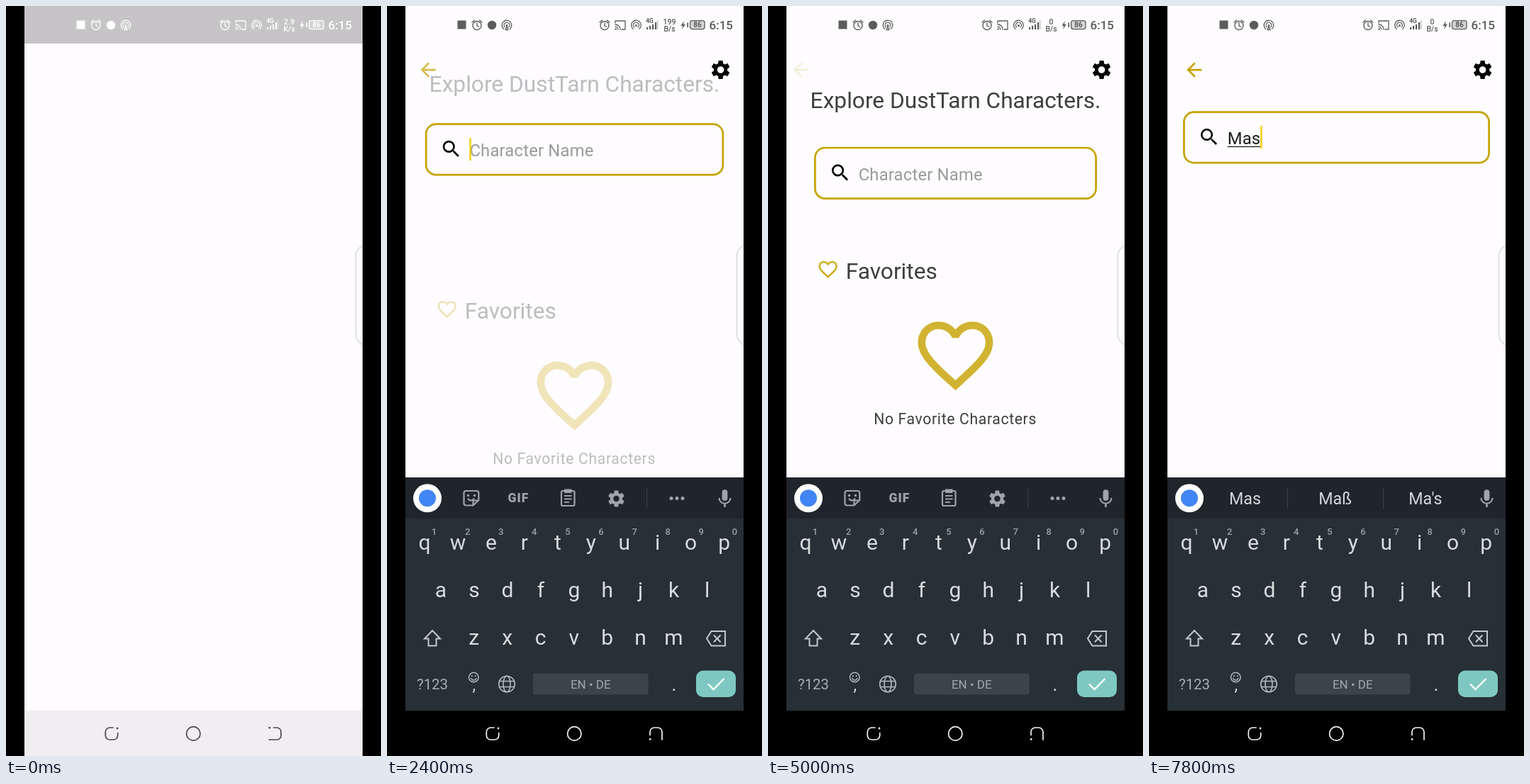
An HTML page with a canvas that plays this animation: 529 by 1058 pixels, repeating every 8 s.

```html
<!DOCTYPE html>
<html lang="en">
<head>
<meta charset="utf-8">
<title>Character search</title>
<style>
html, body { margin: 0; width: 100%; height: 100%; overflow: hidden; background: #000; }
canvas { display: block; width: 529px; height: 1058px; }
</style>
</head>
<body>
<canvas id="stage"></canvas>
<script>
const W = 529, H = 1058, LOOP = 8000, STEP = 200, SLIDE = 900;
const LEFT = 26, WIDE = 477;
const BG = '#fefcff', GOLD = '#c6a302', INK = '#1c1c1c', TOOL = '#a0a4a8', KEY = '#d8dcdf';
const cv = document.getElementById('stage'), c = cv.getContext('2d');
const dpr = window.devicePixelRatio || 1;
cv.width = W * dpr;
cv.height = H * dpr;

const HEART = new Path2D('M16.5 3c-1.74 0-3.41.81-4.5 2.09C10.91 3.81 9.24 3 7.5 3 4.42 3 2 5.42 2 8.5c0 3.78 3.4 6.86 8.55 11.54L12 21.35l1.45-1.32C18.6 15.36 22 12.28 22 8.5 22 5.42 19.58 3 16.5 3zm-4.4 15.55l-.1.1-.1-.1C7.14 14.24 4 11.39 4 8.5 4 6.5 5.5 5 7.5 5c1.54 0 3.04.99 3.57 2.36h1.87C13.46 5.99 14.96 5 16.5 5c2 0 3.5 1.5 3.5 3.5 0 2.89-3.14 5.74-7.9 10.05z');
const ARROW = new Path2D('M20 11H7.83l5.59-5.59L12 4l-8 8 8 8 1.41-1.41L7.83 13H20z');
const LENS = new Path2D('M15.5 14h-.79l-.28-.27A6.47 6.47 0 0 0 16 9.5 6.5 6.5 0 1 0 9.5 16c1.61 0 3.09-.59 4.23-1.57l.27.28v.79l5 4.99L20.49 19zm-6 0a4.5 4.5 0 1 1 0-9 4.5 4.5 0 0 1 0 9z');
const MIC = new Path2D('M12 14a3 3 0 0 0 3-3V5a3 3 0 0 0-6 0v6a3 3 0 0 0 3 3zM17.3 11a5.3 5.3 0 0 1-10.6 0H5a7 7 0 0 0 6 6.7V21h2v-3.3a7 7 0 0 0 6-6.7z');

const clamp = v => Math.min(1, Math.max(0, v));
const mix = (a, b, k) => a + (b - a) * k;

// cubic-bezier(.4, 0, .2, 1)
function ease(x) {
  x = clamp(x);
  let lo = 0, hi = 1, s = x;
  for (let i = 0; i < 24; i++) {
    s = (lo + hi) / 2;
    const bx = 1.2 * s * (1 - s) ** 2 + 0.6 * s * s * (1 - s) + s ** 3;
    if (bx < x) lo = s; else hi = s;
  }
  return 3 * s * s * (1 - s) + s ** 3;
}

function text(str, x, y, size, color, o = {}) {
  c.font = `${o.weight || 400} ${size}px Roboto, Arial, sans-serif`;
  c.textAlign = o.align || 'left';
  c.letterSpacing = (o.gap || 0) + 'px';
  c.fillStyle = color;
  c.fillText(str, x, y);
  return c.measureText(str).width;
}
const mid = (str, x, y, size, color, weight) => text(str, x, y, size, color, { align: 'center', weight });

function rect(x, y, w, h, color) {
  c.fillStyle = color;
  c.fillRect(x, y, w, h);
}
function round(x, y, w, h, r) {
  c.beginPath();
  c.roundRect(x, y, w, h, r);
}
function disc(x, y, r, color) {
  c.fillStyle = color;
  c.beginPath();
  c.arc(x, y, r, 0, 7);
  c.fill();
}
function ring(x, y, r, a = 0, b = Math.PI * 2) {
  c.beginPath();
  c.arc(x, y, r, a, b);
  c.stroke();
}
function pen(color, width) {
  c.strokeStyle = color;
  c.lineWidth = width;
  c.lineCap = c.lineJoin = 'round';
}
function line(...p) {
  c.beginPath();
  for (let i = 0; i < p.length; i += 2) c.lineTo(p[i], p[i + 1]);
  c.stroke();
}
function icon(path, x, y, scale, color) {
  c.save();
  c.translate(x, y);
  c.scale(scale, scale);
  c.fillStyle = color;
  c.fill(path, 'evenodd');
  c.restore();
}
function gear(x, y, scale, color) {
  const pt = (deg, r) => {
    const a = deg * Math.PI / 180;
    c.lineTo(x + Math.cos(a) * r * scale, y + Math.sin(a) * r * scale);
  };
  c.beginPath();
  for (let k = 0; k < 6; k++) {
    const d = 30 + 60 * k;
    pt(d - 21, 7.3); pt(d - 14, 9.7); pt(d - 11, 10);
    pt(d + 11, 10); pt(d + 14, 9.7); pt(d + 21, 7.3);
  }
  c.closePath();
  c.moveTo(x + 3.6 * scale, y);
  c.arc(x, y, 3.6 * scale, 0, 7);
  c.fillStyle = color;
  c.fill('evenodd');
}

function alarm(x, col) {
  pen(col, 1.4);
  ring(x, 27.5, 6);
  line(x, 24, x, 28, x + 2.5, 29.5);
  line(x - 7, 23, x - 3.5, 20);
  line(x + 7, 23, x + 3.5, 20);
}
function hotspot(x, col) {
  pen(col, 1.3);
  ring(x, 27, 6.8, Math.PI * 0.72, Math.PI * 2.28);
  ring(x, 27, 3.9, Math.PI * 0.75, Math.PI * 2.25);
  disc(x, 27.5, 1.5, col);
}

function statusBar(t, shown) {
  c.save();
  c.globalAlpha = 1 - shown;
  rect(LEFT, 0, WIDE, 53, '#c6c4c6');
  c.restore();
  const g = Math.round(mix(255, 92, shown)), col = `rgb(${g},${g},${g})`;
  const rate = t < 2000 ? ['2.9', 'K/s'] : t < 4800 ? ['199', 'B/s'] : ['0', 'B/s'];
  const dx = rate[0] === '199' ? -2 : 0;

  rect(99.5, 20.5, 12, 12, col);
  alarm(127, col);
  disc(148, 27, 6.2, col);
  hotspot(169, col);
  line(169, 29, 167, 33.5, 171, 33.5, 169, 29);

  alarm(309 + dx, col);
  c.save();
  c.translate(331 + dx, 27);
  pen(col, 1.3);
  line(-7, -3, -7, -6, 7, -6, 7, 6, 2, 6);
  ring(-7, 6, 7, -Math.PI / 2, 0);
  ring(-7, 6, 3.8, -Math.PI / 2, 0);
  disc(-6.3, 5.5, 1.2, col);
  c.restore();
  hotspot(353.5 + dx, col);
  mid('4G', 372.5 + dx, 23.5, 8.5, col, 700);
  [3, 5, 7, 10].forEach((h, i) => rect(368 + i * 4 + dx, 33 - h, 2.2, h, col));
  c.globalAlpha = 0.35;
  rect(383 + dx, 20, 1.5, 13, col);
  c.globalAlpha = 1;
  mid(rate[0], 399.5 + dx / 2, 25.5, 10.5, col, 500);
  mid(rate[1], 399.5 + dx / 2, 36, 10.5, col, 500);

  c.fillStyle = col;
  c.beginPath();
  [[419, 21], [414.5, 28], [417.3, 28], [416, 33], [421, 25.8], [418, 25.8]].forEach(p => c.lineTo(...p));
  c.fill();
  rect(423.3, 23.5, 1.8, 6.5, col);
  pen(col, 1.3);
  round(427.6, 20.6, 20.5, 12, 3);
  c.stroke();
  c.globalAlpha = 0.25;
  c.fill();
  c.globalAlpha = 1;
  mid('86', 438, 30.4, 10, col, 700);
  text('6:15', 454.5, 33, 17, col, { weight: 500 });
}

function navBar(t) {
  const dark = t >= 2400;
  rect(LEFT, 994, WIDE, 64, dark ? '#000' : '#f0eef0');
  const col = dark ? '#f4f4f4' : t >= 2200 ? '#fbfafb' : '#4b494b';
  pen(col, 1.7);
  c.save();
  c.translate(149, 1026.5);
  c.beginPath();
  c.moveTo(2, -8.5);
  c.arcTo(-8.7, -8.5, -8.7, 0, 6);
  c.arcTo(-8.7, 8.5, 0, 8.5, 6);
  c.arcTo(8.7, 8.5, 8.7, 0, 6);
  c.lineTo(8.7, -1);
  c.stroke();
  disc(8, -7.5, 1.4, col);
  c.restore();
  ring(264.3, 1026.4, 9.7);
  c.save();
  c.translate(379.5, 1026.5);
  if (t >= 2200) c.rotate(-Math.PI / 2);
  c.beginPath();
  c.moveTo(-2, -8.5);
  c.arcTo(8.5, -8.5, 8.5, 0, 6);
  c.arcTo(8.5, 8.5, 0, 8.5, 6);
  c.lineTo(-8.5, 8.5);
  c.stroke();
  disc(-7.8, -8.3, 1.4, col);
  c.restore();
}

function searchField(t, p, top) {
  const x = mix(68, 48, p), w = 2 * (264.5 - x);
  pen(GOLD, 2.7);
  round(x + 1.4, top + 1.4, w - 2.8, 71.6, 14);
  c.stroke();
  icon(LENS, x + 21, top + 20.7, 1.322, '#080808');
  const typed = t >= 7800 ? 'Mas' : t >= 7600 ? 'Ma' : t >= 7000 ? 'M' : '';
  const tx = x + 62.7, base = top + 47;
  let end = 0;
  if (typed) {
    end = text(typed, tx, base, 23.8, INK, { gap: 0.2 });
    rect(tx, top + 49.6, end, 1.3, INK);
  } else {
    text('Character Name', tx, base, 23.8, '#9b999c', { gap: 0.2 });
  }
  if ((t >= 1800 && t < 3400) || (t >= 3800 && t < 4800) || typed) {
    rect(tx + end - 0.2, top + 21, 2.6, 32, '#f2d01c');
  }
}

function page(t, shown) {
  const slide = from => ease((t - from) / SLIDE);
  const p = t < 3500 ? slide(1989) : t < 4700 ? 1 - slide(3567) : slide(4811);
  const kb = t >= 2400;
  const title = mix(kb ? 150 : 206, 110, p);
  const field = mix(kb ? 207.6 : 285.5, 148.2, p);
  const fav = kb ? 369.5 + 100 * p : 441.5 + 260 * p;
  const heart = fav + (kb ? 60.5 : 132);

  c.globalAlpha = shown * p;
  icon(ARROW, 48 - 20 * (1 - p), 74.2, 1.322, GOLD);
  c.globalAlpha = shown;
  gear(470.6, 90, 1.33, '#050505');

  c.globalAlpha = shown * (1 - p);
  mid('Explore DustTarn Characters.', 264.5, title, 31.7, INK);
  icon(HEART, 68.8, fav - 29, 1.322, GOLD);
  text('Favorites', 109.7, fav, 31.7, INK);
  icon(HEART, 201, heart - 15.8, 5.29, '#c9a70c');
  text('No Favorite Characters', 149.2, heart + 144.7, 21.15, INK, { gap: 0.66 });
  c.globalAlpha = shown;
  searchField(t, p, field);
  c.globalAlpha = 1;
}

function edgeHandle() {
  round(493.5, 337, 40, 142, 16);
  c.fillStyle = BG;
  c.fill();
  pen('#dcdae0', 1.6);
  c.stroke();
}

function toolIcons() {
  pen(TOOL, 2.2);
  c.beginPath();
  c.moveTo(121, 704.5);
  c.arcTo(108.5, 704.5, 108.5, 690, 3);
  c.arcTo(108.5, 684, 120, 684, 3);
  c.arcTo(129.3, 684, 129.3, 695, 3);
  c.lineTo(129.3, 697);
  c.lineTo(121.5, 704.5);
  c.lineTo(121.5, 697.5);
  c.lineTo(129.3, 697.5);
  c.stroke();
  disc(114.5, 690.5, 1.7, TOOL);
  disc(123.5, 690.5, 1.7, TOOL);
  ring(118.5, 693, 4.5, 0.5, 2.6);

  text('GIF', 170.5, 700.3, 17.5, TOOL, { weight: 900, gap: 1 });

  round(246, 684, 18.5, 21, 2);
  c.stroke();
  rect(250, 681.5, 10.5, 5.5, TOOL);
  [691, 695.5, 700].forEach((y, i) => rect(250, y - 1, i < 2 ? 10.5 : 7, 1.9, TOOL));

  gear(323.5, 695, 1.18, TOOL);
  rect(366, 680, 1, 29, '#3b4148');
  [401, 409, 417].forEach(x => disc(x, 694.5, 2.5, TOOL));
}

function suggestions(words) {
  words.forEach((w, i) => mid(w, 135.5 + 127.2 * i, 703.3, 23.3, '#d3d7da'));
  rect(195, 680, 1, 30, '#3b4148');
  rect(330, 680, 1, 30, '#3b4148');
}

function keyboard(t) {
  rect(LEFT, 665, WIDE, 329, '#263036');
  rect(LEFT, 665, WIDE, 58, '#20242b');
  disc(57, 694.3, 20, '#fff');
  disc(57, 694.3, 12, '#4285f4');
  if (t < 7400) toolIcons();
  else suggestions(t < 7600 ? ['M', 'Mit', 'Man'] : t < 7800 ? ['Ma', 'Mal', 'May'] : ['Mas', 'Maß', "Ma's"]);
  icon(MIC, 460.9, 679.6, 1.3, TOOL);

  const caps = t >= 6000 && t < 7400;
  [['qwertyuiop', 53, 766.5], ['asdfghjkl', 76, 833.5], ['zxcvbnm', 122.8, 900.5]].forEach(([row, x, y], r) => {
    [...row].forEach((ch, i) => {
      mid(caps ? ch.toUpperCase() : ch, x + 46.95 * i, y, 30, KEY);
      if (!r) mid((i + 1) % 10, x + 13.5 + 47.1 * i, 746, 13, '#9ca2a6', 500);
    });
  });

  pen('#c3c8cb', 2);
  c.lineJoin = 'miter';
  c.beginPath();
  [[64, 881], [75, 892.5], [69.5, 892.5], [69.5, 902.5], [58.5, 902.5], [58.5, 892.5], [53, 892.5]].forEach(q => c.lineTo(...q));
  c.closePath();
  c.stroke();
  if (caps) {
    c.fillStyle = '#c3c8cb';
    c.fill();
  }
  c.beginPath();
  [[457.5, 882], [477, 882], [477, 902.5], [457.5, 902.5], [451, 892.3]].forEach(q => c.lineTo(...q));
  c.closePath();
  c.stroke();
  line(461.5, 888, 470, 896.7);
  line(470, 888, 461.5, 896.7);

  mid('?123', 64, 964, 20.4, '#a8aeb2');
  pen('#b4babd', 1.5);
  ring(122.3, 947, 6.8);
  ring(122.3, 947.5, 3.6, 0.3, 2.84);
  disc(119.9, 945, 1.1, '#b4babd');
  disc(124.7, 945, 1.1, '#b4babd');
  mid(',', 122.8, 965.5, 23, KEY);
  pen('#b4babd', 1.6);
  ring(169, 956.5, 11.3);
  c.beginPath();
  c.ellipse(169, 956.5, 5, 11.3, 0, 0, 7);
  c.stroke();
  line(158.8, 952.5, 179.2, 952.5);
  line(158.8, 960.5, 179.2, 960.5);

  c.fillStyle = '#3b444c';
  round(206, 941.5, 162.5, 30, 4);
  c.fill();
  mid('EN • DE', 287.3, 962.5, 17, '#a0a6ab');
  mid('.', 405, 966, 26, KEY);
  c.fillStyle = '#7fc8c2';
  round(436, 937.5, 56, 37.5, 10);
  c.fill();
  pen('#fff', 2.4);
  c.lineCap = 'butt';
  c.lineJoin = 'miter';
  line(453, 956.5, 460.5, 964, 475.5, 949);
}

function draw(t) {
  c.setTransform(dpr, 0, 0, dpr, 0, 0);
  rect(0, 0, W, H, '#000');
  c.save();
  c.beginPath();
  c.rect(LEFT, 0, WIDE, H);
  c.clip();
  rect(LEFT, 0, WIDE, 994, BG);
  const shown = t < 400 ? 0 : clamp((t - 200) / 800);
  statusBar(t, shown);
  page(t, shown);
  edgeHandle();
  if (t >= 2400) keyboard(t);
  navBar(t);
  c.restore();
}

let start;
function tick(now) {
  if (start === undefined) start = now;
  const t = (now - start) % LOOP;
  draw(Math.floor(t / STEP) * STEP);
  requestAnimationFrame(tick);
}
draw(0);
requestAnimationFrame(tick);
</script>
</body>
</html>
```
